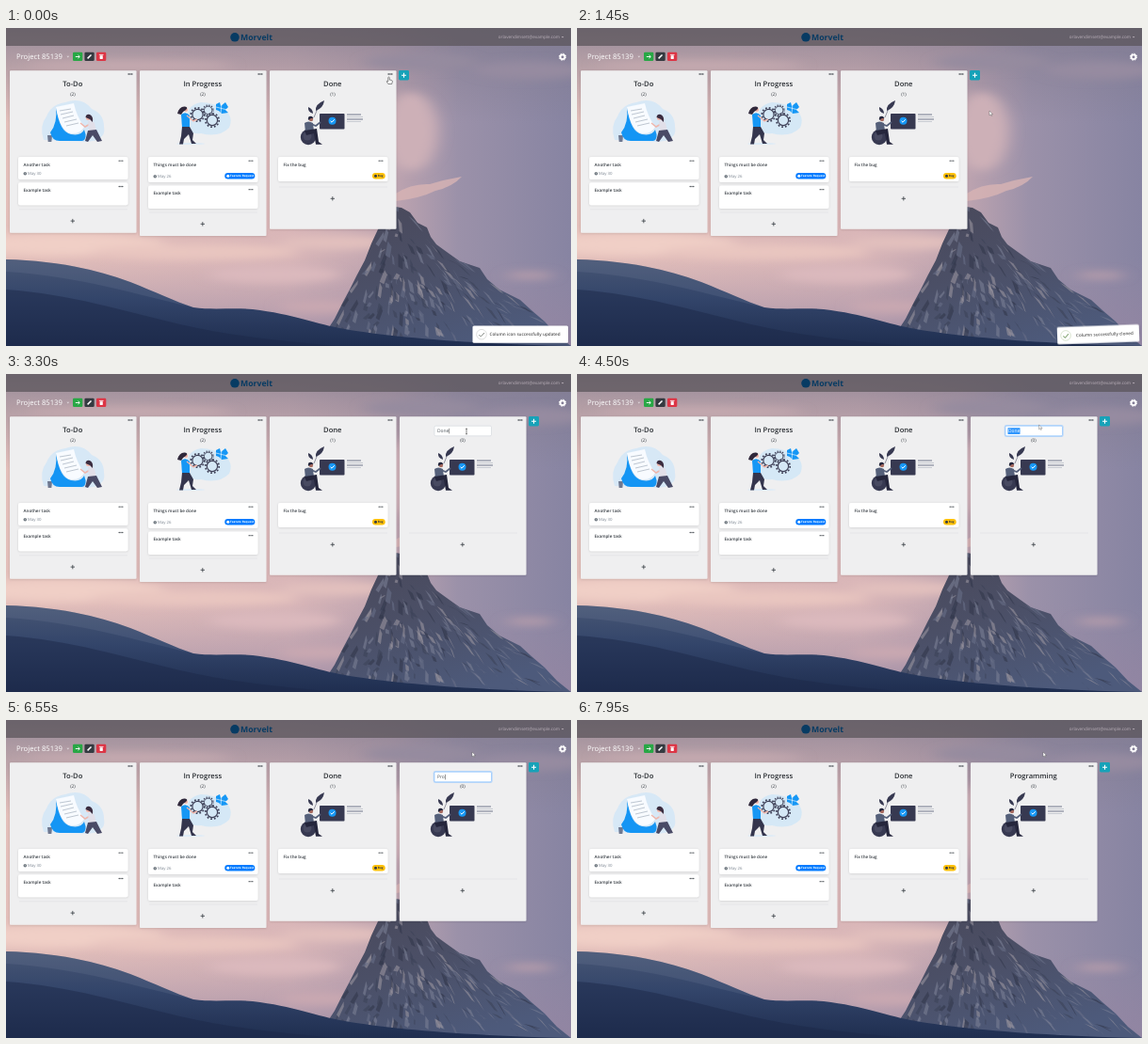
Recreate the animation shown at these times as an HTML page. Size 600 px wide and 338 px high, loop 8 s.

```html
<!DOCTYPE html>
<html lang="en">
<head>
<meta charset="utf-8">
<title>Kanban board</title>
<style>
  html, body { margin: 0; width: 100%; height: 100%; overflow: hidden; background: #a697a4; }
  svg { position: fixed; inset: 0; width: 100%; height: 100%; display: block; }
  text { font-family: "Open Sans", "Noto Sans", sans-serif; text-rendering: geometricPrecision; white-space: pre; }
  #scene { will-change: transform; }
</style>
</head>
<body>
<svg id="scene" viewBox="0 0 600 338">
  <defs>
    <linearGradient id="sky">
      <stop offset="0" stop-color="#e3bfba"/><stop offset=".5" stop-color="#d9b6b8"/>
      <stop offset=".68" stop-color="#c0a5b0"/><stop offset=".8" stop-color="#9b91a9"/>
      <stop offset="1" stop-color="#8784a2"/>
    </linearGradient>
    <linearGradient id="dusk" x2="0" y2="1">
      <stop offset="0" stop-color="#817b8f" stop-opacity=".75"/><stop offset=".3" stop-color="#817b8f" stop-opacity="0"/>
      <stop offset=".72" stop-color="#9b8aa4" stop-opacity="0"/><stop offset="1" stop-color="#9585a2" stop-opacity=".75"/>
    </linearGradient>
    <linearGradient id="hill" x2="0" y2="1">
      <stop offset="0" stop-color="#485674"/><stop offset=".45" stop-color="#33456a"/>
      <stop offset="1" stop-color="#1f2e50"/>
    </linearGradient>
    <linearGradient id="rock" x2=".6" y2="1">
      <stop offset="0" stop-color="#494859"/><stop offset=".5" stop-color="#4b4f66"/>
      <stop offset="1" stop-color="#4d5a7b"/>
    </linearGradient>
    <filter id="soft" x="-50%" y="-100%" width="200%" height="300%"><feGaussianBlur stdDeviation="8 4"/></filter>
    <clipPath id="peak"><use href="#mountain"/></clipPath>
  </defs>
  <rect width="600" height="338" fill="url(#sky)"/>
  <rect width="600" height="338" fill="url(#dusk)"/>
  <g id="clouds" filter="url(#soft)"></g>
  <path fill="#d9b5b5" opacity=".8" d="M414 176 Q430 165 450 166 Q466 161 484 158 Q474 169 456 173 Q440 181 414 184Z"/>
  <path id="mountain" fill="url(#rock)" d="M330 338 L349 309 358 291 365 278 373 262 381 247 388 229 395 214 404 200 412 190 420 191 429 196 437 207 447 212 451 222 457 230 468 238 482 248 503 255 511 267 524 278 546 289 558 300 572 312 585 326 600 338Z"/>
  <g id="ridges" clip-path="url(#peak)"></g>
  <path fill="url(#hill)" d="M0 246 C45 247 88 254 132 270 C160 281 178 290 199 297 C220 300 240 297 262 299 C305 304 330 315 360 320 C410 329 500 336 600 338 H0Z"/>
  <path fill="#1c2949" opacity=".5" d="M0 278 C70 283 125 301 185 315 C240 328 300 333 350 338 H0Z"/>
  <path fill="#8490a8" opacity=".16" d="M0 246 C45 247 88 254 132 270 C160 281 178 290 199 297 C140 284 80 264 0 259Z"/>
</svg>

<svg id="board" viewBox="0 0 600 338">
  <defs>
    <filter id="shade" x="-20%" y="-40%" width="140%" height="190%">
      <feDropShadow dx="0" dy=".5" stdDeviation=".8" flood-opacity=".14"/>
    </filter>
    <g id="writing">
      <path fill="#cfe6f8" d="M40 119 Q35 104 43 94 Q48 81 63 79 Q81 73 91 86 Q104 91 104 105 Q107 120 84 121Z" opacity=".75"/>
      <path fill="#6f7890" d="M44 114 H49 L48.3 121 H44.7Z"/>
      <path fill="#1495f4" d="M53 84 Q55 101 47 111 Q49 120 57 120 H81 Q87 118 83 108 Q80 115 69 113 Q57 111 53 84Z"/>
      <path fill="#f8fbff" d="M53 84 L72 80 Q75 94 83 105 Q79 113 69 112 Q58 110 53 84Z"/>
      <path stroke="#a4afbc" stroke-width=".7" d="M57 88 L69 86 M58 92 L71 89 M60 96 L72 93 M62 100 L75 97 M64 104 L77 101"/>
      <path fill="none" stroke="#efb7ad" stroke-width="1.6" d="M91 101 L84 105 79 101"/>
      <path fill="#e1dfe9" d="M87 99 Q91 97 94 101 L96 110 88 110Z"/>
      <circle cx="87.5" cy="95.5" r="2.6" fill="#efb7ad"/>
      <path d="M84.5 95 Q85 91 89 92 Q93 94 92 100 L89 97Z" fill="#3b2d40"/>
      <path fill="#494a66" d="M87 109 L96 108 102 120 97 121 92 114 87 121 84 120Z"/>
    </g>
    <g id="gears">
      <path fill="#cfe6f8" d="M192 101 Q190 82 207 79 Q220 79 232 87 Q242 94 237 106 Q226 117 207 112 Q193 114 192 101Z" opacity=".8"/>
      <ellipse cx="196" cy="123" rx="15" ry="1" fill="#dcebf7"/>
      <g fill="none" stroke="#3f4158">
        <g id="wheel"><circle cx="203.5" cy="92" r="5.6" stroke-width="1.2"/><circle cx="203.5" cy="92" r="7.2" stroke-width="1.7" stroke-dasharray="1.8 1.97"/></g>
        <use href="#wheel" transform="translate(15.5 6)"/>
        <use href="#wheel" transform="translate(62 18.4) scale(.75)"/>
      </g>
      <path fill="#1697f5" d="M223 81 L227 79 228 83 233 79 236 84 233 87 236 90 229 91 226 88 223 87Z"/>
      <path fill="none" stroke="#fff" stroke-width=".6" d="M223 84 L235 87 M229 80 L228 91"/>
      <path fill="#1697f5" d="M186 92 Q191 88 195 93 L195 105 187 106Z"/>
      <path stroke="#efb4a9" stroke-width="1.4" fill="none" d="M192 93 L199 99 203 97"/>
      <path fill="#34354d" d="M187 105 H195 L199 112 198 119 202 123 H197 L194 113 189 118 188 123.5 H184 L186 115Z"/>
      <circle cx="191" cy="87" r="2.1" fill="#efb4a9"/><path fill="#30283b" d="M182 91 Q184 83 190 83.5 Q194 84 191 87 Q187 89 186 92Z"/>
    </g>
    <g id="presenting">
      <path fill="#373951" d="M329 88 Q328 81 338 77 Q337 85 329 88Z M326 91 Q320 89 321 84 Q326 86 326 91Z"/>
      <path stroke="#373951" stroke-width=".5" d="M332 83 L327 95"/>
      <rect x="333" y="91" width="26.5" height="16.5" rx=".8" fill="#373951"/>
      <circle cx="346.5" cy="98.7" r="4" fill="#1697f5"/>
      <path fill="none" stroke="#fff" stroke-width="1" d="M344.6 98.8 L346 100.2 348.7 97.3"/>
      <path stroke="#73788c" stroke-width="1.1" d="M362 92 H377 M362 97 H379"/>
      <path stroke="#c5c8d0" stroke-width=".9" d="M362 94.5 H379 M362 99.5 H377"/>
      <circle cx="321" cy="116" r="8.2" fill="#373951"/><circle cx="320" cy="115" r="4.5" fill="#484a61"/>
      <path fill="#55607a" d="M317 101 Q321 98 326 101 L327 110 318 111Z"/>
      <path fill="none" stroke="#55607a" stroke-width="1.7" d="M324 102 L329 104 334 100"/>
      <path fill="#25263c" d="M317 109 L330 107 332 121 336 123.8 H329 L327 112 319 114Z"/>
      <circle cx="324" cy="97" r="2.2" fill="#a5695e"/><path fill="#25263c" d="M321 98 Q320 93 325 94 L326.5 96 324 96Z"/>
    </g>
  </defs>
  <rect width="600" height="19" fill="#595459" opacity=".72"/>
  <g id="static"></g>
  <g id="clone"></g>
  <g id="add"><rect x="417" y="45" width="11" height="10.5" rx="1.4" fill="#17a2b8"/><path stroke="#fff" stroke-width="1.1" d="M420 50.2 H425 M422.5 47.7 V52.7"/></g>
  <g id="menu"></g>
  <g id="toastA"></g>
  <g id="toastB"></g>
  <g id="cursor">
    <path id="hand" fill="#fff" stroke="#222" stroke-width=".5" d="M-.7 0 Q0 -.9 .7 0 V2.6 L3 3 Q4 3.2 3.8 4.6 L3.2 7 H-.6 L-2.4 4.3 Q-2.3 3.4 -.7 4.5Z"/>
    <path id="arrow" fill="#fff" stroke="#444" stroke-width=".35" d="M0 0 V4.9 L1.2 3.9 2 5.6 2.8 5.2 2 3.6 H3.5Z"/>
    <path id="beam" fill="none" stroke="#333" stroke-width=".6" d="M-1 -2.8 H1 M0 -2.8 V2.8 M-1 2.8 H1"/>
  </g>
</svg>

<script>
const $ = id => document.getElementById(id);
const label = (x, y, s, size = 4.4, fill = '#343a40', weight = 600, anchor = 'start') =>
  `<text x="${x}" y="${y}" font-size="${size}" fill="${fill}" font-weight="${weight}" text-anchor="${anchor}">${s}</text>`;
const box = (x, y, w, h, fill, r = 1, extra = '') =>
  `<rect x="${x}" y="${y}" width="${w}" height="${h}" rx="${r}" fill="${fill}" ${extra}/>`;
const dot = (x, y, r, fill) => `<circle cx="${x}" cy="${y}" r="${r}" fill="${fill}"/>`;
const line = (d, stroke, w = .6) => `<path d="${d}" fill="none" stroke="${stroke}" stroke-width="${w}"/>`;
const dots = (x, y, r = .8) => [-1.8, 0, 1.8].map(d => dot(x + d, y, r, '#343a40')).join('');

// Scenery
const clouds = [
  [60, 230, 110, 12, '#f0cfc6'], [200, 238, 110, 8, '#e9c6c0'], [130, 40, 110, 5, '#c6aab0'],
  [285, 262, 70, 9, '#dbb9bd'], [335, 296, 45, 7, '#c9a8b1'], [430, 110, 28, 42, '#cdb0b7'],
  [440, 36, 60, 8, '#958b9f'], [555, 45, 60, 10, '#968ba0'], [556, 263, 26, 4, '#b69dab'],
  [350, 228, 60, 8, '#e2c0bd']
];
$('clouds').innerHTML = clouds.map(([x, y, rx, ry, c]) =>
  `<ellipse cx="${x}" cy="${y}" rx="${rx}" ry="${ry}" fill="${c}"/>`).join('');
let seed = 11;
const random = () => (seed = seed * 16807 % 2147483647) / 2147483647;
$('ridges').innerHTML = Array.from({ length: 210 }, () => {
  const depth = Math.sqrt(random()), y = 186 + 140 * depth, side = random();
  const x = 414 - 72 * depth + side * 240 * depth;
  const len = 3 + random() * 12, lean = (side - .33) * 22 + random() * 6 - 3;
  const color = ['#99959f', '#7b7f95', '#33374c', '#3d4359', '#686e88'][Math.floor(random() * 5)];
  return `<path d="M${x} ${y} l${lean} ${len} l${1 + random() * 4} ${len * .2} l${-lean * .7} ${-len * .8}Z" fill="${color}" opacity=".6"/>`;
}).join('');

// Columns and cards
const column = (x, h, name, count, art, ruleY) =>
  box(x, 45.3, 134.5, h, '#efeff0', 1, 'filter="url(#shade)"') + dots(x + 128, 49) +
  (name ? label(x + 66.8, 62, name, 7.6, '#292d32', 600, 'middle') : '') +
  label(x + 67, 72.4, `(${count})`, 4.8, '#343a40', 400, 'middle') + art +
  line(`M${x + 10} ${ruleY} H${x + 125}`, '#d9d9dc', .5) +
  line(`M${x + 64.6} ${ruleY + 12.3} h4.4 m-2.2 -2.2 v4.4`, '#343a40', .8);
const card = (x, y, h, title, date = '') =>
  box(x, y, 116.5, h, '#fff', 2, 'filter="url(#shade)"') + dots(x + 109, y + 4.2, .65) +
  label(x + 5.5, y + 9.9, title, 4.55) +
  (date && dot(x + 7.3, y + h - 6.3, 1.8, '#6c757d') +
    line(`M${x + 7.3} ${y + h - 7.3} v1.2 h.8`, '#fff', .4) + label(x + 10, y + h - 4.7, date, 4.3, '#7b8490', 400));
const badge = (x, w, s, bg, fg) => box(x, 154, w, 6.6, bg, 3.3) + dot(x + 3.5, 157.3, 1.5, fg) +
  label(x + 5.8, 158.4, s, 3.05, fg, 700);
const button = (x, color, icon) => box(x, 25.8, 10.3, 9.3, color, 1.3) + icon;
const use = id => `<use href="#${id}"/>`;

$('static').innerHTML =
  dot(243, 9.8, 4.8, '#073b63') + label(249, 13, 'Morvelt', 8.7, '#073b63', 700) +
  label(588, 11.2, 'orlavendimsett@example.com', 4.6, '#b9b0b9', 400, 'end') +
  '<path d="M589.8 9 h2.6 l-1.3 1.5Z" fill="#b9b0b9"/>' +
  label(11, 33.2, 'Project 85139', 7.7, '#fff', 400) + '<path d="M64.4 29.8 h2.8 l-1.4 1.6Z" fill="#ddd4da"/>' +
  button(71, '#28a745', line('M73.8 30.5 H78 M76.5 28.8 L78.3 30.5 76.5 32.2', '#fff', .9)) +
  button(83.4, '#343a40', line('M86.6 32.4 L90.5 28.5', '#fff', 1.5)) +
  button(96, '#dc3545', box(99.6, 29.2, 3.2, 3.8, '#fff', .4) + line('M98.9 28.4 h4.6', '#fff', .8)) +
  '<g fill="none" stroke="#fff"><circle cx="591" cy="30.7" r="2.4" stroke-width="1.8"/><circle cx="591" cy="30.7" r="3.6" stroke-width="1" stroke-dasharray="1.5 1.33"/></g>' +
  column(4, 172.5, 'To-Do', 2, use('writing'), 192.8) + card(13, 137, 24, 'Another task', 'May 30') + card(13, 164.3, 24, 'Example task') +
  column(142, 175.7, 'In Progress', 2, use('gears'), 196) + card(151, 137, 27, 'Things must be done', 'May 26') +
  card(151, 167.5, 24.5, 'Example task') + badge(232.3, 32, 'Feature Request', '#007bff', '#fff') +
  column(280, 168.5, 'Done', 1, use('presenting'), 169) + card(289, 137, 26, 'Fix the bug') + badge(389, 13.7, 'Bug', '#ffc107', '#343a40');

$('clone').innerHTML = column(418, 168.5, '', 0, '<use href="#presenting" x="138"/>', 169) +
  label(484.8, 62, '', 7.6, '#292d32', 600, 'middle').replace('<text', '<text id="title"') +
  '<g id="edit">' + box(453.7, 54, 63, 13, '#80bdff', 2.2, 'id="ring" fill-opacity=".45"') +
  box(455, 55.2, 60.5, 10.6, '#fff', 1.4, 'id="field" stroke-width=".6"') +
  box(457.5, 57.2, 13, 6.8, '#3297fd', 0, 'id="selection"') +
  label(458, 62.3, '', 4.9, '#495057', 400).replace('<text', '<text id="typed"') +
  box(0, 57.8, .5, 5.6, '#333', 0, 'id="caret"') + '</g>';

$('menu').innerHTML = box(408, 46.8, 24, 24.6, '#fff', 1.2, 'filter="url(#shade)"') + box(408, 49, 24, 10.3, '#007bff', 0) +
  label(412.8, 56, 'Clone', 4.8, '#fff', 400) + label(412.8, 66.6, 'Delete', 4.8, '#343a40', 400);

const toast = (left, iconX, textX, s, ring, tick) =>
  box(left, 316.5, 597 - left, 18.3, '#fff', 1.5, 'filter="url(#shade)"') +
  `<circle cx="${iconX}" cy="325.7" r="5.3" fill="none" stroke="${ring}" stroke-width=".9"/>` +
  line(`M${iconX - 2.7} 326 l2 2 l3.7 -4`, tick, 1) + label(textX, 327.3, s, 4.6, '#545454');
$('toastA').innerHTML = toast(495.5, 505, 513.5, 'Column icon successfully updated', '#d8dad8', '#858b85');
$('toastB').innerHTML = toast(510, 519, 530, 'Column successfully cloned', '#d5e2cb', '#87a878');

// Motion
const LOOP = 8000;
const ease = p => p * p * (3 - 2 * p);
const clamp = v => Math.min(1, Math.max(0, v));
const show = (id, on) => $(id).style.display = on ? '' : 'none';
function track(steps, t) {
  const i = steps.findIndex(s => s[0] > t);
  if (i < 0) return steps[steps.length - 1].slice(1);
  if (i === 0) return steps[0].slice(1);
  const [a, b] = [steps[i - 1], steps[i]], p = ease((t - a[0]) / (b[0] - a[0]));
  return a.slice(1).map((v, k) => v + (b[k + 1] - v) * p);
}
const pointer = [
  [0, 406.5, 52.5], [350, 407, 51], [600, 413.5, 54.5], [950, 414, 55], [1350, 438, 88], [1600, 438, 88],
  [2400, 483, 66], [2800, 489, 61], [4350, 489, 61], [4800, 495, 34], [8000, 495, 34]
];
const wobble = [[0, -3.1, 2], [.33, 0, -2], [.66, 1.6, 2], [1, 0, 0]];
const keys = [5700, 6150, 6400, 6650, 6900, 7080, 7250, 7350, 7450, 7550, 7650];
const EDIT = 3250, ERASE = 5150, COMMIT = 7800;

function placeToast(id, t, from, to, middle) {
  const [dy, turn] = track(wobble, (t - from) / 500), out = clamp((t - to) / 100);
  show(id, t >= from && out < 1);
  $(id).setAttribute('transform', `translate(0 ${dy}) rotate(${turn + out} ${middle} 325.7)`);
  $(id).setAttribute('opacity', 1 - out);
}

function draw(t) {
  const [x, y] = track(pointer, t);
  $('cursor').setAttribute('transform', `translate(${x} ${y})`);
  const overText = t >= 2500 && t < 4480;
  show('hand', t < 1000);
  show('beam', overText);
  show('arrow', t >= 1000 && !overText);

  show('menu', t >= 400 && t < 950);
  placeToast('toastA', t, -1000, 400, 546);
  placeToast('toastB', t, 1285, 2900, 554);

  const cloned = t >= 1650, editing = t >= EDIT && t < COMMIT;
  show('clone', cloned);
  $('add').setAttribute('transform', `translate(${cloned ? 138 : 0} 0)`);
  show('edit', editing);
  $('title').textContent = editing ? '' : t < EDIT ? 'Done' : 'Programming';
  if (!editing) return;

  const typed = t < ERASE ? 'Done' : 'Programming'.slice(0, keys.filter(k => k <= t).length);
  const selected = t >= 4150 && t < ERASE, focus = clamp((t - EDIT - 50) / 150);
  $('typed').textContent = typed;
  $('typed').setAttribute('fill', selected ? '#fff' : '#495057');
  show('selection', selected);
  $('ring').setAttribute('opacity', focus);
  $('field').setAttribute('stroke', focus > .5 ? '#80bdff' : '#ced4da');
  $('caret').setAttribute('x', 458.3 + (typed ? $('typed').getComputedTextLength() : 0));
  const lastKey = Math.max(EDIT, ...[ERASE, ...keys].filter(k => k <= t));
  show('caret', !selected && (t - lastKey) % 1000 < 500);
}

const start = performance.now();
function tick() {
  draw((performance.now() - start) % LOOP);
  requestAnimationFrame(tick);
}
tick();
</script>
</body>
</html>
```
